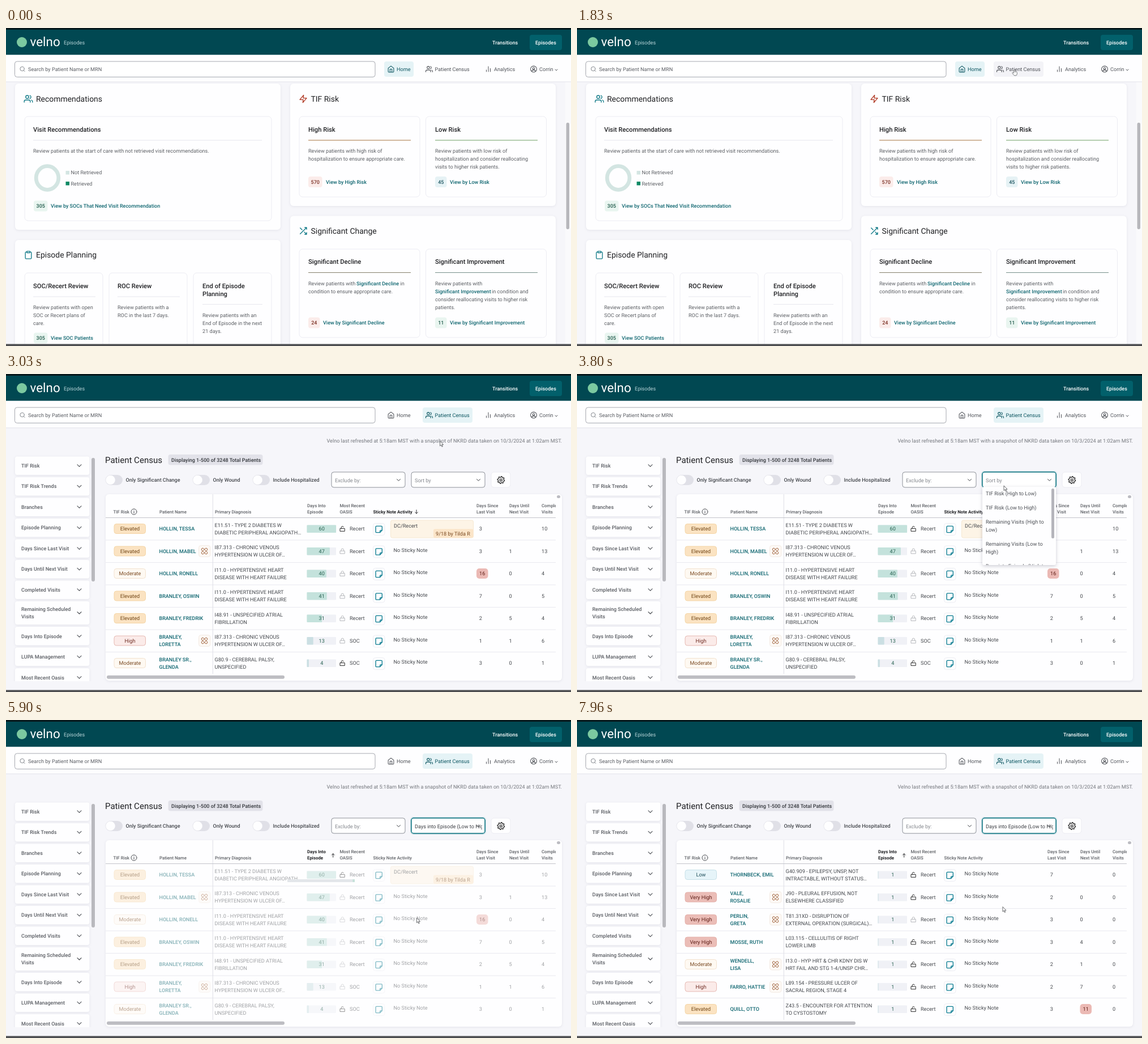
Animation of 998x561 px, one loop 8 s. Source, as an HTML page:

```html
<!DOCTYPE html>
<html lang="en">
<head>
<meta charset="utf-8">
<title>Patient census</title>
<style>
  html, body { margin: 0; width: 100%; height: 100%; overflow: hidden; background: #f6f6fa; }
  svg { display: block; width: 998px; height: 561px; font-family: Roboto, sans-serif; text-rendering: geometricPrecision; }
  text { white-space: pre; }
  .card { filter: drop-shadow(0 1px 2px rgba(40, 40, 80, .09)); }
  .pop { filter: drop-shadow(0 2px 3px rgba(30, 30, 60, .22)); }
</style>
</head>
<body>
<svg id="stage" viewBox="0 0 998 561"></svg>
<script>
const INK = '#202124', GREY = '#5c5f64', TEAL = '#0f6670', LINE = '#e7e7ee';
const BODY = 9.13, MED = 9;

// y is the vertical middle of the capitals
const text = (x, y, s, size = BODY, fill = GREY, weight = 400, anchor = 'start') =>
  `<text x="${x}" y="${(y + size * .355).toFixed(2)}" font-size="${size}" fill="${fill}" font-weight="${weight}" text-anchor="${anchor}">${s.replace(/&/g, '&amp;')}</text>`;
const lines = (x, y, rows, step, ...style) => rows.map((s, i) => text(x, y + i * step, s, ...style)).join('');
const rect = (x, y, w, h, fill, r = 0, stroke = 'none', extra = '') =>
  `<rect x="${x}" y="${y}" width="${w}" height="${h}" rx="${r}" fill="${fill}" stroke="${stroke}" ${extra}/>`;
const card = (x, y, w, h, r = 6) => rect(x, y, w, h, '#fefeff', r, 'none', 'class="card"');
const hline = (x, y, w, color) => rect(x, y - .5, w, 1, color);
const group = (id, body, extra = '') => `<g id="${id}" ${extra}>${body}</g>`;
const link = (x, y, s) => text(x, y, s, MED, TEAL, 500);
const ring = (x, y, r) => `M${x + r} ${y}a${r} ${r} 0 1 1 ${-2 * r} 0a${r} ${r} 0 1 1 ${2 * r} 0`;

const gear = Array.from({ length: 32 }, (_, i) => {
  const a = (i + .5) * Math.PI / 16, r = i % 4 < 2 ? 10.5 : 7.8;
  return `${i ? 'L' : 'M'}${(12 + r * Math.cos(a)).toFixed(1)} ${(12 + r * Math.sin(a)).toFixed(1)}`;
}).join('') + 'z' + ring(12, 12, 3.2);

const ICONS = {
  users: 'M17 21v-2a4 4 0 0 0-4-4H5a4 4 0 0 0-4 4v2M23 21v-2a4 4 0 0 0-3-3.87M16 3.13a4 4 0 0 1 0 7.75' + ring(9, 7, 4),
  home: 'M3 9l9-7 9 7v11a2 2 0 0 1-2 2H5a2 2 0 0 1-2-2zM9 22V12h6v10',
  bars: 'M19 21V10M12 21V3M5 21v-6',
  zap: 'M13 2L3 14h9l-1 8 10-12h-9l1-8z',
  clip: 'M16 4h2a2 2 0 0 1 2 2v14a2 2 0 0 1-2 2H6a2 2 0 0 1-2-2V6a2 2 0 0 1 2-2h2M8 2h8v4H8z',
  shuffle: 'M16 3h5v5M4 20L21 3M21 16v5h-5M15 15l6 6M4 4l5 5',
  search: ring(11, 11, 8) + 'M21 21l-4.35-4.35',
  person: ring(12, 12, 10) + ring(12, 10, 3.2) + 'M6.2 19a6 6 0 0 1 11.6 0',
  chevron: 'M6 9l6 6 6-6',
  info: ring(12, 12, 10) + 'M12 17v-6M12 7.5v.5',
  down: 'M12 4v16M6 14l6 6 6-6',
  up: 'M12 20V4M6 10l6-6 6 6',
  open: 'M3 11h18v11H3zM7 11V7a5 5 0 0 1 9.6-1.8',
  lock: 'M3 11h18v11H3zM7 11V7a5 5 0 0 1 10 0v4',
  note: 'M15 21H5a2 2 0 0 1-2-2V5a2 2 0 0 1 2-2h14a2 2 0 0 1 2 2v10zM15 21v-4a2 2 0 0 1 2-2h4',
  patch: 'M3.2 8.8a4 4 0 0 1 5.6-5.6l12 12a4 4 0 0 1-5.6 5.6zM15.2 3.2a4 4 0 0 1 5.6 5.6l-12 12a4 4 0 0 1-5.6-5.6z',
  gear
};
const icon = (name, cx, cy, size, color, w = 2) =>
  `<path transform="translate(${cx - size / 2} ${cy - size / 2}) scale(${size / 24})" d="${ICONS[name]}" fill="none" stroke="${color}" stroke-width="${w}" stroke-linecap="round" stroke-linejoin="round"/>`;

function header() {
  const tab = (id, x, w, name, ix, tx, label) =>
    group(id + 'Hover', rect(x, 59, w, 27, '#f3f3f7', 4)) +
    group(id + 'On', rect(x, 59, w, 27, '#e5f3f6', 4) + icon(name, ix, 72.5, 13, '#0c5560') + text(tx, 73, label, BODY, '#0c5560')) +
    group(id + 'Off', icon(name, ix, 72.5, 13, '#505359') + text(tx, 73, label, BODY, '#505359'));
  return rect(0, 0, 998, 47.5, '#014852') + rect(0, 0, 998, 3, '#06181c') +
    '<circle cx="28" cy="25" r="9" fill="#7cc9a0"/>' +
    text(42.5, 24, 'velno', 22.4, '#fff') + text(102, 26, 'Episodes', BODY, '#b9d5d9') +
    text(859, 26, 'Transitions', MED, '#fff', 500) +
    rect(925, 12, 57, 27, '#02606b', 4) + text(935, 26, 'Episodes', MED, '#fff', 500) +
    rect(0, 47.5, 998, 47, '#fefeff') + hline(0, 95, 998, '#e6e6ec') +
    rect(15.5, 59, 636.5, 27.5, '#fff', 4, '#a6a9b0') + icon('search', 29, 72.5, 11, '#777b82') +
    text(39, 73, 'Search by Patient Name or MRN', BODY, '#5a5d63') +
    tab('home', 668, 52, 'home', 680, 690, 'Home') +
    tab('census', 736, 88, 'users', 747.5, 757.5, 'Patient Census') +
    icon('bars', 852, 72.5, 12, '#505359') + text(862, 73, 'Analytics', BODY, '#505359') +
    icon('person', 932, 72.5, 13, '#505359') + text(942, 73, 'Corrin', BODY, '#505359') +
    icon('chevron', 972, 74, 8, '#505359', 3);
}

function homePage() {
  const head = (x, y, name, color, s) => icon(name, x, y, 16, color) + text(x + 13.5, y, s, 13.95, INK);
  const box = (x, y, w, h) => rect(x, y, w, h, '#fefeff', 6, '#ececf3');
  const title = (x, y, s) => text(x, y, s, 11.2, INK, 500);
  const badge = (x, y, n, bg, fg) => {
    const w = n.length > 2 ? 24.5 : 20.5;
    return rect(x, y - 9.5, w, 19, bg, 4) + text(x + w / 2, y, n, MED, fg, 500, 'middle');
  };
  const green = ['#e9f5f0', '#1f5a4a'], red = ['#fbecea', '#7a2e22'], blue = ['#e6f2f5', '#1d5560'];
  const paras = (x, y, ...rows) => lines(x, y, rows, 14);
  return card(16, 98, 469, 258) + head(39.5, 125, 'users', '#117a88', 'Recommendations') +
    box(33, 156, 436, 184) + title(48, 179, 'Visit Recommendations') + hline(48, 198, 404, LINE) +
    paras(48, 217, 'Review patients at the start of care with not retrieved visit recommendations.') +
    '<ellipse cx="73" cy="264.5" rx="19.8" ry="20.8" fill="none" stroke="#d3e5e2" stroke-width="6.8"/>' +
    rect(105.5, 252, 6.5, 6.5, '#d3e5e2') + text(114.5, 255, 'Not Retrieved') +
    rect(105.5, 271, 6.5, 6.5, '#0d8a66') + text(114.5, 274.5, 'Retrieved') +
    badge(49, 314, '305', ...green) + link(79, 314, 'View by SOCs That Need Visit Recommendation') +

    card(16, 374, 469, 210) + head(39.5, 400.5, 'clip', '#117a88', 'Episode Planning') +
    [33, 182, 331].map(x => box(x, 432, 138, 150)).join('') +
    title(48, 455, 'SOC/Recert Review') + hline(48, 474, 110, LINE) +
    paras(48, 493, 'Review patients with open', 'SOC or Recert plans of', 'care.') +
    badge(49, 547, '305', ...green) + link(79, 547, 'View SOC Patients') +
    title(197, 455, 'ROC Review') + hline(197, 474, 110, LINE) + paras(197, 493, 'Review patients with a', 'ROC in the last 7 days.') +
    title(347, 455, 'End of Episode') + title(347, 469, 'Planning') + hline(347, 487.5, 106, LINE) +
    paras(347, 507, 'Review patients with an', 'End of Episode in the next', '21 days.') +

    card(502, 98, 469, 216) + head(525, 125, 'zap', '#b13a25', 'TIF Risk') +
    box(518, 156, 213, 142) + box(741.5, 156, 213, 142) +
    title(534, 179, 'High Risk') + hline(534, 198, 181, '#a8753f') +
    paras(534, 217, 'Review patients with high risk of', 'hospitalization to ensure appropriate care.') +
    badge(534, 271.5, '570', ...red) + link(565, 271.5, 'View by High Risk') +
    title(758, 179, 'Low Risk') + hline(758, 198, 181, '#6f9f62') +
    paras(758, 217, 'Review patients with low risk of', 'hospitalization and consider reallocating', 'visits to higher risk patients.') +
    badge(758, 271.5, '45', ...blue) + link(784, 271.5, 'View by Low Risk') +

    card(502, 331.5, 469, 240) + head(525, 358, 'shuffle', '#117a88', 'Significant Change') +
    box(518, 390, 213, 156) + box(741.5, 390, 213, 156) +
    title(534, 412.5, 'Significant Decline') + hline(534, 431.5, 181, '#85806a') +
    paras(534, 450.5, 'Review patients with', 'condition to ensure appropriate care.') +
    link(619, 451, 'Significant Decline') + text(696.5, 450.5, 'in') +
    badge(534, 520, '24', ...red) + link(560, 520, 'View by Significant Decline') +
    title(758, 412.5, 'Significant Improvement') + hline(758, 431.5, 181, '#77908a') +
    text(758, 450.5, 'Review patients with') + link(758, 464.5, 'Significant Improvement') + text(858, 464.5, 'in condition and') +
    paras(758, 478.5, 'consider reallocating visits to higher risk', 'patients.') +
    badge(758, 520, '11', ...green) + link(784, 520, 'View by Significant Improvement') +
    rect(988, 95, 10, 463, '#fafafc') + rect(989.5, 167, 5.5, 188, '#b7b7bc', 2.7);
}

// risk, name, wound, diagnosis, days, unlocked, type, since, until, completed
const BEFORE = [
  ['Elevated', 'HOLLIN, TESSA', 0, 'E11.51 - TYPE 2 DIABETES W|DIABETIC PERIPHERAL ANGIOPATH…', 60, 1, 'Recert', 3, '', 10],
  ['Elevated', 'HOLLIN, MABEL', 1, 'I87.313 - CHRONIC VENOUS|HYPERTENSION W ULCER OF…', 47, 0, 'Recert', 3, 1, 13],
  ['Moderate', 'HOLLIN, RONELL', 0, 'I11.0 - HYPERTENSIVE HEART|DISEASE WITH HEART FAILURE', 40, 0, 'Recert', 16, 0, 4],
  ['Elevated', 'BRANLEY, OSWIN', 0, 'I11.0 - HYPERTENSIVE HEART|DISEASE WITH HEART FAILURE', 41, 0, 'Recert', 7, 0, 5],
  ['Elevated', 'BRANLEY, FREDRIK', 0, 'I48.91 - UNSPECIFIED ATRIAL|FIBRILLATION', 31, 0, 'Recert', 2, 5, 4],
  ['High', 'BRANLEY,|LORETTA', 1, 'I87.313 - CHRONIC VENOUS|HYPERTENSION W ULCER OF…', 13, 0, 'SOC', 1, 1, 6],
  ['Moderate', 'BRANLEY SR.,|GLENDA', 0, 'G80.9 - CEREBRAL PALSY,|UNSPECIFIED', 4, 1, 'SOC', 3, 0, 1]
];
const AFTER = [
  ['Low', 'THORNBECK, EMIL', 0, 'G40.909 - EPILEPSY, UNSP, NOT|INTRACTABLE, WITHOUT STATUS…', 1, 1, 'Recert', 7, '', 0],
  ['Very High', 'VALE,|ROSALIE', 1, 'J90 - PLEURAL EFFUSION, NOT|ELSEWHERE CLASSIFIED', 1, 1, 'Recert', 2, 0, 0],
  ['Very High', 'PERLIN,|GRETA', 1, 'T81.31XD - DISRUPTION OF|EXTERNAL OPERATION (SURGICAL)…', 1, 0, 'Recert', 3, 0, 0],
  ['Very High', 'MOSSE, RUTH', 0, 'L03.115 - CELLULITIS OF RIGHT|LOWER LIMB', 1, 1, 'Recert', 3, 4, 0],
  ['Moderate', 'WENDELL,|LISA', 1, 'I13.0 - HYP HRT & CHR KDNY DIS W|HRT FAIL AND STG 1-4/UNSP CHR…', 1, 1, 'Recert', 2, 1, 0],
  ['High', 'FARRO, HATTIE', 1, 'L89.154 - PRESSURE ULCER OF|SACRAL REGION, STAGE 4', 1, 1, 'Recert', 2, 7, 0],
  ['Elevated', 'QUILL, OTTO', 0, 'Z43.5 - ENCOUNTER FOR ATTENTION|TO CYSTOSTOMY', 1, 1, 'Recert', 3, 11, 0]
];
const RISK = {
  Elevated: ['#fbe3c2', '#f4d5a6', '#704414'], Moderate: ['#fef9f2', '#f3e2cf', '#7a4a22'],
  High: ['#fbebe9', '#e6b9b3', '#6e2a20'], 'Very High': ['#ebbdb7', '#e4b0aa', '#5e1d16'], Low: ['#e6f4f9', '#c6e0e8', '#1a4b57']
};

function rows(data) {
  const pair = (x, y, s, ...style) => {
    const p = s.split('|');
    return lines(x, y - (p.length - 1) * 6.4, p, 12.8, ...style);
  };
  const count = (x, y, n, indent) => n > 10
    ? rect(x, y - 9, 20.5, 18, '#ebb9b4', 5) + text(x + 10.2, y, '' + n, BODY, '#5e1d16', 400, 'middle')
    : text(x + indent, y, '' + n, BODY, '#45484d');
  return data.map(([risk, name, wound, diag, days, open, type, since, until, done], i) => {
    const y = 273 + i * 39.5, [bg, edge, fg] = RISK[risk];
    return rect(191, y - 8.5, 55.5, 17, bg, 4, edge) + text(219, y, risk, BODY, fg, 400, 'middle') +
      pair(270.5, y, name, MED, TEAL, 500) +
      (wound ? rect(340.5, y - 10, 20.5, 20, '#fdf9f5', 4, '#f3ebe4') + icon('patch', 350.5, y, 13, '#96532a', 1.8) : '') +
      pair(368.5, y, diag, BODY, '#45484d') +
      rect(531.5, y - 6.5, 51.5, 13.5, '#f0f1f6', 1) +
      rect(531.5, y - 6.5, Math.max(1, days * .86), 13.5, days > 20 ? '#c4e2dc' : '#cbdfe3', 1) +
      text(557.7, y, '' + days, BODY, '#25604f', 400, 'middle') +
      icon(open ? 'open' : 'lock', 594.3, y, 10.5, open ? '#222' : '#b4b6ba', 2.2) + text(607, y, type, BODY, '#45484d') +
      rect(648.5, y - 9.5, 20.5, 21, '#fefeff', 4, '#ededf3') + icon('note', 658.7, y + 1, 15, '#0b7c91', 2.2) +
      `<g class="memo${i}">` + text(684.5, y - 2, 'No Sticky Note', BODY, '#45484d') + '</g>' +
      count(831, y, since, 4.8) + count(888.5, y, until, 0) + text(946, y, '' + done, BODY, '#45484d');
  }).join('');
}

function censusPage() {
  const menu = ['TIF Risk', 'TIF Risk Trends', 'Branches', 'Episode Planning', 'Days Since Last Visit', 'Days Until Next Visit',
    'Completed Visits', 'Remaining Scheduled|Visits', 'Days Into Episode', 'LUPA Management', 'Most Recent Oasis'];
  let y = 145.5;
  const side = menu.map(s => {
    const p = s.split('|'), h = p.length > 1 ? 41 : 32.4, mid = y + h / 2;
    const out = card(16, y, 131.5, h, 4) + lines(27, mid - (p.length - 1) * 6.5, p, 13, MED, '#5a5d63', 500) + icon('chevron', 129.5, mid, 14, '#55585e');
    y += h + 4.1;
    return out;
  }).join('');
  const toggle = (x, s) => rect(x, 178, 30.5, 18, '#e0e0e7', 9) + `<circle cx="${x + 9}" cy="187" r="8.3" fill="#fefeff"/>` + text(x + 36, 187, s, MED, '#45484d', 500);
  const select = x => rect(x, 173, 130, 27, '#fff', 4, '#8d9199') + icon('chevron', x + 118.5, 187, 12, '#3c3f44');
  const col = (x, s, color = GREY, w = 500) => {
    const p = s.split('|');
    return lines(x, 243.3 - (p.length - 1) * 11.3, p, 11.3, 7.85, color, w);
  };
  const bar = (id, x, y, w) => group(id, rect(x, y, w, 5, '#e3e6ea') +
    `<svg x="${x}" y="${y}" width="${w}" height="5">${rect(0, 0, 65, 5, '#c6e2da', 0, 'none', `id="${id}Seg"`)}</svg>`);
  const options = ['TIF Risk (High to Low)', 'TIF Risk (Low to High)', 'Remaining Visits (High to|Low)', 'Remaining Visits (Low to|High)',
    'Days into Episode (High to|Low)', 'Days into Episode (Low to|High)'];
  const rules = Array.from({ length: 6 }, (_, i) => hline(176, 293 + i * 39.5, 795, '#e9e9ef')).join('');

  return `<g clip-path="url(#sideClip)">${side}</g>` + rect(151, 148, 6, 218, '#b9b9be', 3) +
    bar('topBar', 865, 118, 117) +
    group('stamp', text(982, 118, 'Velno last refreshed at 5:18am MST with a snapshot of NKRD data taken on 10/3/2024 at 1:02am MST.', 9.11, '#74777d', 400, 'end')) +
    group('tools', text(175, 152, 'Patient Census', 15.05, INK) +
      rect(286.5, 142, 167, 18.5, '#e2e2e9', 4) + text(292, 151.5, 'Displaying 1-500 of 3248 Total Patients', MED, '#33363b', 500) +
      toggle(175.5, 'Only Significant Change') + toggle(329.5, 'Only Wound') + toggle(435.5, 'Include Hospitalized') +
      select(575) + text(581, 187.5, 'Exclude by:', BODY, '#85888e') +
      select(716) +
      group('focus', rect(716, 173, 130, 27, 'none', 4, '#17808d', 'stroke-width="1.5"') + rect(714.5, 171.5, 133, 30, 'none', 5, 'rgba(23,128,141,.25)')) +
      group('sortHint', text(722, 187.5, 'Sort by', BODY, '#85888e')) +
      group('sortPick', text(722, 187.5, 'Days into Episode (Low to High)', BODY, '#3c3f44'), 'clip-path="url(#pickClip)"') +
      rect(857, 173, 34, 27, '#fefeff', 5, '#ececf2') + icon('gear', 874.3, 187, 14.5, '#222')) +
    group('table', card(176, 212, 806, 329) + rules +
      rect(364.8, 212, 1, 317, '#dedee5') + hline(176, 253.5, 795, '#c3c4ca') +
      col(189.5, 'TIF Risk') + icon('info', 226, 243, 12, '#4a4d52') + col(271, 'Patient Name') + col(369, 'Primary Diagnosis') +
      col(589.5, 'Most Recent|OASIS') + col(831, 'Days Since|Last Visit') + col(889, 'Days Until|Next Visit') +
      `<g clip-path="url(#tableClip)">${col(946, 'Completed|Visits')}</g>` +
      group('sortA', col(532, 'Days Into|Episode') + col(648.5, 'Sticky Note Activity', INK, 700) + icon('down', 725, 243, 9.5, INK, 2.4)) +
      group('sortB', col(532, 'Days Into|Episode', INK, 700) + col(648.5, 'Sticky Note Activity') + icon('up', 577.7, 239, 9.5, INK, 2.4)) +
      group('data', group('before', rows(BEFORE) +
        group('memo', rect(679.5, 258, 146, 31, '#fdf4e6', 3, '#f7e8d2') + text(685, 267.5, 'DC/Recert', BODY, '#45484d') +
          rect(755, 273.5, 70.5, 15.5, '#fbe5c9', 3) + text(759, 281.5, '9/18 by Tilda R', BODY, '#7a4a22'))) +
        group('after', rows(AFTER))) +
      rect(973, 214, 6, 5, '#bcbcc2', 2.5)) +
    rect(178, 531.8, 314, 6, '#bdbdc2', 3) +
    bar('rowBar', 497, 281, 119) +
    group('panel', rect(716, 199, 130, 138, '#fefeff', 3, 'none', 'class="pop"') +
      `<g clip-path="url(#panelClip)"><g id="list">${rect(716, 0, 119, 25, '#ebebf1', 0, 'none', 'id="hot"')}` +
      options.map((s, i) => lines(722, TOPS[i] + 12.6, s.split('|'), 14, BODY, '#4b4e54')).join('') + '</g></g>' +
      rect(838, 202, 5, 88, '#b5b5bb', 2.5, 'none', 'id="thumb"'));
}

const TOPS = [198.5, 223.5, 248.5, 287.3, 326.1, 364.9, 403.7];
const clip = (id, x, y, w, h) => `<clipPath id="${id}">${rect(x, y, w, h, '#000')}</clipPath>`;
const stage = document.getElementById('stage');
stage.innerHTML = '<defs>' + clip('sideClip', 8, 130, 146, 412) + clip('tableClip', 176, 212, 795, 329) +
  clip('pickClip', 716, 173, 125, 27) + clip('panelClip', 716, 199, 130, 138) + '</defs>' +
  rect(0, 0, 998, 561, '#f6f6fa') + group('homePage', homePage()) + group('censusPage', censusPage()) + header() +
  rect(0, 557.5, 998, 3.5, '#4d4e51') +
  group('hand', '<path d="M-1.3-4.2c0-1.2 1.8-1.2 1.8 0v3.2l3 .7c.9.3 1.2.9 1 1.7l-.7 3.2c-.2.8-.5 1.2-1.3 1.2h-2.6c-.7 0-1.1-.3-1.5-.9l-2.4-3.2c-.7-1 .6-1.9 1.4-1.1l1.3 1z" fill="#fff" stroke="#55585c" stroke-width=".8"/>') +
  group('arrow', '<path d="M0 0v8.6l2-1.8 1.4 3.2 1.3-.6-1.4-3.1h2.7z" fill="#fff" stroke="#44474b" stroke-width=".8"/>');

const el = id => document.getElementById(id);
const show = (id, on) => { el(id).style.display = on ? '' : 'none'; };
const move = (id, x, y) => el(id).setAttribute('transform', `translate(${x.toFixed(2)} ${y.toFixed(2)})`);
const set = (id, name, v) => el(id).setAttribute(name, v);
const ease = k => k * k * (3 - 2 * k);
const clamp = k => Math.min(1, Math.max(0, k));

const LOOP = 8000, PAGE = 1850, LOADED = 2850, OPEN = 3600, PICK = 5450, SORTED = 7420;
// time, x, y of the pointer
const PATH = [[450, 700, 557], [900, 765, 73], [1000, 765, 73], [1180, 773, 78], [2750, 773, 78], [3450, 755, 192], [3700, 754, 197],
  [4000, 754, 197], [4420, 775, 317.5], [5550, 775, 317.5], [6100, 704.5, 362.5], [7250, 704.5, 362.5], [7800, 752, 329.5], [LOOP, 752, 329.5]];

function pointer(t) {
  const i = PATH.findIndex(p => p[0] > t);
  if (i < 1) return null;
  const [t0, x0, y0] = PATH[i - 1], [t1, x1, y1] = PATH[i], k = ease((t - t0) / (t1 - t0));
  return [x0 + (x1 - x0) * k, y0 + (y1 - y0) * k];
}

function draw(t) {
  const census = t >= PAGE, first = census && t < LOADED, picked = t >= PICK;
  const second = picked && t < SORTED, panel = t >= OPEN && !picked;
  const p = pointer(t), over = p && p[1] < 86 && p[0] > 736 && p[0] < 824;

  show('homePage', !census); show('censusPage', census);
  show('homeOn', !census); show('homeOff', census); show('homeHover', false);
  show('censusOn', census); show('censusOff', !census); show('censusHover', !census && over);

  show('hand', over); show('arrow', p && !over);
  if (p) move(over ? 'hand' : 'arrow', p[0], p[1]);

  show('topBar', first); show('stamp', !first); show('rowBar', first || second);
  move('tools', 0, first ? -1.8 : 0);
  move('table', 0, first ? -1.2 : 0);
  const phase = (((t - (first ? 1630 : 5915)) / 1500) % 1 + 1) % 1;
  for (const id of ['topBarSeg', 'rowBarSeg']) set(id, 'x', (182 * phase - 65).toFixed(1));

  set('data', 'opacity', first || second ? .5 : 1);
  show('before', t < SORTED); show('after', t >= SORTED);
  show('memo', !first);
  document.querySelector('#before .memo0').style.display = first ? '' : 'none';
  show('sortA', !picked); show('sortB', picked);
  show('sortHint', !picked); show('sortPick', picked);
  show('focus', t >= OPEN);

  show('panel', panel);
  if (panel) {
    const k = ease(clamp((t - 4500) / 200)), scroll = 67 * k;
    move('list', 0, -scroll);
    set('thumb', 'y', 202 + 44 * k);
    // the highlight only follows once the pointer stirs after scrolling
    const at = p[1] + (t > 5100 ? scroll : 0), i = TOPS.findIndex(y => y > at) - 1;
    show('hot', p[1] > 205);
    if (i >= 0) { set('hot', 'y', TOPS[i]); set('hot', 'height', TOPS[i + 1] - TOPS[i]); }
  }
}

const start = performance.now();
function frame() {
  draw((performance.now() - start) % LOOP);
  requestAnimationFrame(frame);
}
frame();
</script>
</body>
</html>
```
